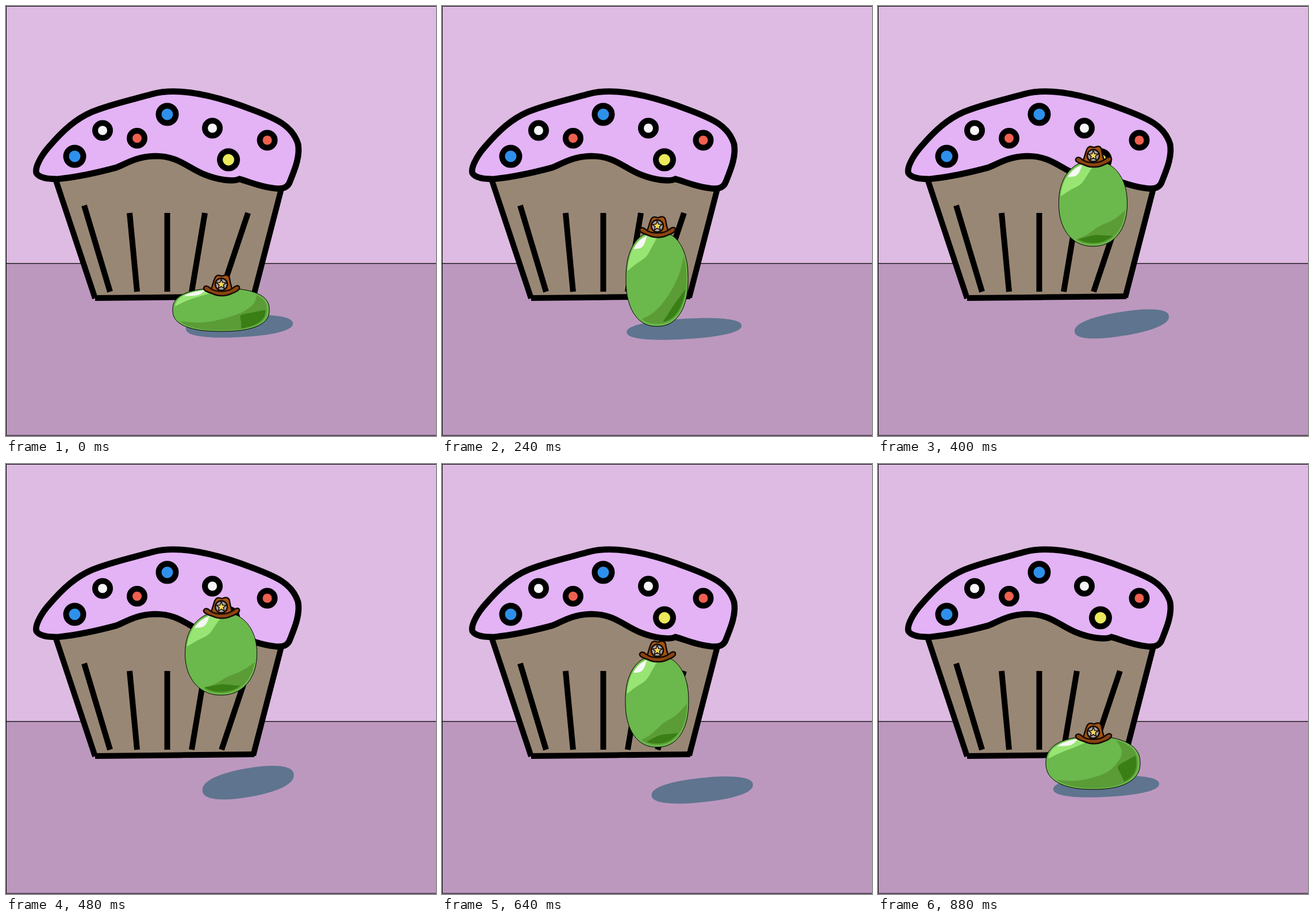
These frames come from a looping animation (748x748 px, 960 ms). An HTML page:

```html
<!DOCTYPE html>
<html lang="en">
<head>
<meta charset="utf-8">
<title>Bouncing bean</title>
<style>
  html, body { margin: 0; width: 100%; height: 100%; overflow: hidden; background: #bc98be; }
  svg { display: block; width: 100vw; height: 100vh; }
</style>
</head>
<body>
<svg viewBox="0 0 748 748">
  <g stroke="#000">
    <path fill="#debbe2" d="M.5 .5H760V448H.5Z"/>
    <path fill="#bc98be" d="M.5 448H760V747H.5Z"/>
  </g>

  <g stroke="#000" stroke-width="10" fill="none">
    <path fill="#998775" stroke="none" d="M86 296L155 507L431 505L480 312L400 250H190Z"/>
    <path d="M85 298L155 508.500"/>
    <path d="M155 508L432 505"/>
    <path d="M430 507L480 314"/>
    <path d="M136 347L181 497M215 360L228 497M280.500 360V497M346 360L323 497M421 360L375 497"/>
    <path fill="#e3b3f5" stroke-width="10.700" d="M255 153C300 141 365 156 430 181C470 196 498 208 508 240
      C512 262 502 285 494 305C490 317 480 319 466 317C440 314 425 306 406 301C395 306 370 303 345 293
      C315 281 300 261 260 261C225 262 210 274 192 281C155 291 120 298 90 301C72 301 58 299 53 291
      C50 283 58 265 72 248C100 215 122 196 150 184C185 170 220 163 255 153Z"/>
    <g id="dots"></g>
  </g>

  <path id="shadow" fill="#5f748f"/>
  <path id="body" fill="#6bb84c" stroke="#000"/>
  <path id="shade" fill="#5b9c37"/>
  <path id="dark" fill="#397f15"/>
  <path id="light" fill="#98e574"/>
  <path id="shine" fill="#f6f8f4"/>
  <g id="hat" stroke="#140a04" stroke-width="2.500" stroke-linejoin="round">
    <path fill="#a5530f" d="M-18 9C-14 1 -13 -11 -9 -14C-5 -18 -1 -14 2 -14.500C7 -17 12 -17 14 -12C15 -5 17 3 19 9C10 16 -8 16 -18 9Z"/>
    <path fill="#8c4410" d="M-30 5C-33 10 -25 13 -16 16C-6 21 8 21 18 16C26 13 34 9 31 4C29 1 24 3 21 6C11 14 -10 14 -19 7C-24 2 -28 2 -30 5Z"/>
    <circle r="10.500" fill="#a3a1a8"/>
    <path id="star" fill="#f7d95a" stroke-width="1.500"/>
  </g>
</svg>

<script>
const $ = id => document.getElementById(id);
const rad = deg => deg * Math.PI / 180;
const step = 80, loop = 960, midX = 374;

// Key poses: bean top, bottom, half width, angle of the dark spot;
// shadow centre x, y and radii.
const poses = [
  { at: 0,   v: [491, 566, 84, 32, 406, 557, 93, 19] },
  { at: 160, v: [449, 566, 64, 35, 410, 565, 87, 21] },
  { at: 320, v: [332, 534, 48, 60, 431, 557, 110, 15] },
  { at: 400, v: [269, 418, 59.5, 85, 424, 553, 82, 21] },
  { at: 560, v: [270, 419, 62.5, 85, 425, 558, 82, 27] },
  { at: 720, v: [405, 566, 51, 65, 471, 574, 94, 15] },
  { at: 880, v: [474, 566, 82, 15, 397, 561, 92, 18] }
];

// Catmull-Rom blend of the poses around time t.
function poseAt(t) {
  const n = poses.length;
  const i = poses.findLastIndex(p => p.at <= t);
  const [a, b, c, d] = [-1, 0, 1, 2].map(o => poses[(i + o + n) % n].v);
  const k = (t - poses[i].at) / ((i + 1 < n ? poses[i + 1].at : loop) - poses[i].at);
  return b.map((p, j) => p + k / 2 * (c[j] - a[j] +
    k * (2 * a[j] - 5 * p + 4 * c[j] - d[j] + k * (3 * (p - c[j]) + d[j] - a[j]))));
}

const range = (n, f) => Array.from({ length: n + 1 }, (_, i) => f(i / n));
const path = pts => 'M' + pts.map(p => p.map(v => v.toFixed(2)).join(' ')).join('L') + 'Z';

// Superellipse: maps an angle and a relative radius to a point.
const blob = (x, y, w, h, power, slope = 0) => (deg, r = 1) => {
  const c = Math.cos(rad(deg)), s = Math.sin(rad(deg));
  const q = r * (Math.abs(c) ** power + Math.abs(s) ** power) ** (-1 / power);
  return [x + w * q * c, y + h * q * s + slope * w * q * c];
};

const ring = shape => path(range(90, u => shape(360 * u)));

// Patch hugging the rim of a shape from one angle to another.
function crescent(shape, from, to, rim, depth) {
  const edge = range(30, u => shape(from + (to - from) * u, rim));
  const inner = range(30, u =>
    shape(to + (from - to) * u, rim - depth * Math.sin(Math.PI * u) ** 0.8));
  return path([...edge, ...inner]);
}

function draw(t) {
  const [top, bottom, w, spot, sx, sy, sw, sh] = poseAt(t);
  const h = (bottom - top) / 2;
  const stretch = Math.log(w / h), squash = Math.max(0, stretch);
  const bean = blob(midX, top + h, w, h, 2.1 + 0.45 * Math.abs(stretch));
  const slope = -0.05 - 0.0007 * (566 - bottom);
  const set = (id, d) => $(id).setAttribute('d', d);

  set('shadow', ring(blob(sx, sy, sw, sh, 2.3, slope)));
  set('body', ring(bean));
  set('shade', crescent(bean, 120 + 35 * squash, spot - 75, 0.95, 0.32 + 0.35 * Math.abs(stretch)));
  set('dark', crescent(bean, spot + 32, spot - 32, 0.92, 0.18 + 0.35 * squash));
  set('light', crescent(bean, 190, 275, 0.96, 0.4 - 0.2 * squash));
  set('shine', crescent(bean, 220, 250, 0.94, 0.15));
  $('hat').setAttribute('transform', `translate(${midX + 0.5} ${top - 5 - 0.05 * h})`);
}

const blue = '#2f90ec', white = '#f6f6f6', red = '#ef6050', yellow = '#ebe95c';
const dots = [
  [119.5, 261.5, 15, blue], [168, 216.5, 13, white], [228, 230, 13, red], [280.5, 188.5, 15, blue],
  [359, 212.5, 13, white], [454.5, 233.5, 13, red], [387, 267.5, 15, yellow]
];
$('dots').innerHTML = dots.map(([x, y, r, fill]) =>
  `<circle cx="${x}" cy="${y}" r="${r}" fill="${fill}"/>`).join('');

$('star').setAttribute('d', path(range(9, u => {
  const i = Math.round(u * 9), r = i % 2 ? 3.8 : 9;
  return [r * Math.cos(rad(36 * i - 90)), r * Math.sin(rad(36 * i - 90))];
})));

const start = performance.now();
let last = 0;
draw(0);

function tick() {
  const t = Math.floor((performance.now() - start) % loop / step) * step;
  if (t !== last) draw(last = t);
  requestAnimationFrame(tick);
}
requestAnimationFrame(tick);
</script>
</body>
</html>
```
